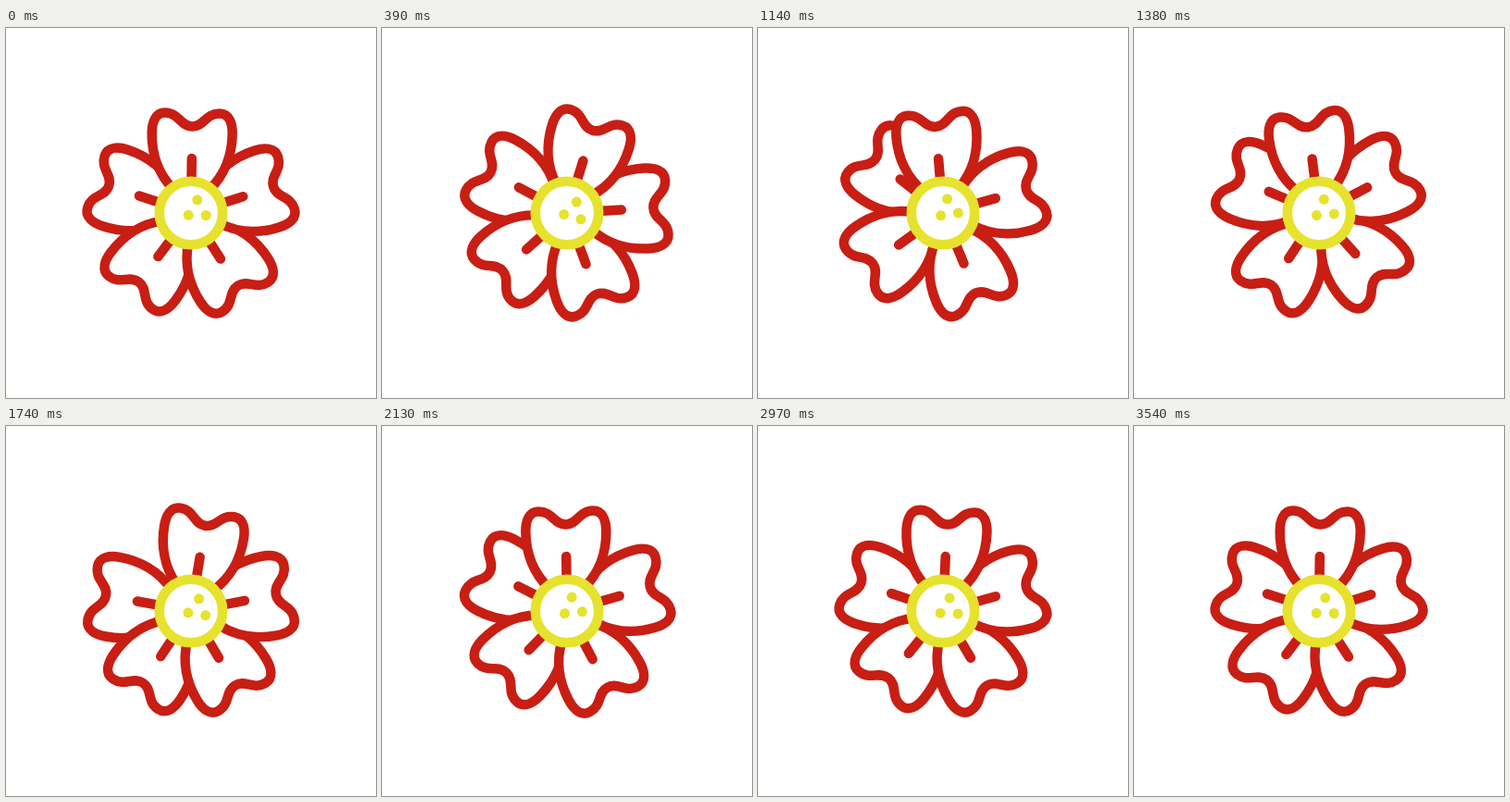
Animation of 400 by 400 pixels, one loop 3.57 s. Source, as an HTML page:

```html
<!DOCTYPE html>
<html lang="en">
<head>
<meta charset="utf-8">
<title>Swaying flower</title>
<style>
  html, body { margin: 0; width: 100%; height: 100%; overflow: hidden; background: #fff; }
  svg { display: block; width: 100vw; height: 100vh; }
  #petal { fill: #fff; stroke: #c81e14; stroke-width: 10.5; stroke-linecap: round; stroke-linejoin: round; }
  .ring { fill: #fff; stroke: #e6e22d; stroke-width: 10.6; }
  .dot { fill: #e6e22d; }
</style>
</head>
<body>
<svg viewBox="-200 -200 400 400">
  <defs>
    <g id="petal">
      <path d="M-20 -26C-36 -42 -43.5 -64 -43.5 -86C-43.5 -97 -40 -108 -29.5 -108C-14 -108 -13 -93.5 0 -93.5C13 -93.5 14 -108 29.5 -108C40 -108 43.5 -97 43.5 -86C43.5 -64 36 -42 20 -26"/>
      <path d="M0 -30V-59"/>
    </g>
  </defs>
  <g id="petals"></g>
  <circle class="ring" r="34.2"/>
  <g id="core">
    <circle class="dot" cx="6.8" cy="-14.2" r="5.5"/>
    <circle class="dot" cx="-2.8" cy="2.3" r="5.5"/>
    <circle class="dot" cx="16.2" cy="2.5" r="5.5"/>
  </g>
</svg>
<script>
const LOOP = 3570, STEP = 30, LAG = 90;
const REST = [0.8, 72.4, 147.2, 217.1, 288.3];

// [time in ms, swing in degrees]
const PETAL_SWING = [[560, 19.5], [770, 20], [1270, -10.4], [1750, 8.6], [2310, -4.7], [2760, 2.2]];
const CORE_SWING = [[550, 18], [1230, -10], [1690, 8], [2190, -7], [2690, 1.8]];

const inOut = u => (1 - Math.cos(Math.PI * u)) / 2;
const softStart = u => (inOut(u) + Math.sin(Math.PI * u / 2)) / 2;

function swing(keys, t, lag) {
  let [t0, a0] = [0, 0];
  for (const [time, angle] of keys) {
    const t1 = time + lag;
    if (t < t1) {
      const ease = t0 ? inOut : softStart;
      return a0 + (angle - a0) * ease((t - t0) / (t1 - t0));
    }
    [t0, a0] = [t1, angle];
  }
  return a0 * (1 - inOut((t - t0) / (LOOP - t0)));
}

const group = document.getElementById('petals');
const core = document.getElementById('core');
const petals = REST.map(() => {
  const use = document.createElementNS('http://www.w3.org/2000/svg', 'use');
  use.setAttribute('href', '#petal');
  group.prepend(use); // the first petal lies on top
  return use;
});

const turn = (node, angle) => node.setAttribute('transform', `rotate(${angle.toFixed(3)})`);

function draw(now) {
  const t = Math.floor((now % LOOP) / STEP) * STEP;
  petals.forEach((petal, i) => turn(petal, REST[i] + swing(PETAL_SWING, t, i * LAG)));
  turn(core, swing(CORE_SWING, t, 0));
}

let start;
function tick(now) {
  start ??= now;
  draw(now - start);
  requestAnimationFrame(tick);
}
draw(0);
requestAnimationFrame(tick);
</script>
</body>
</html>
```
